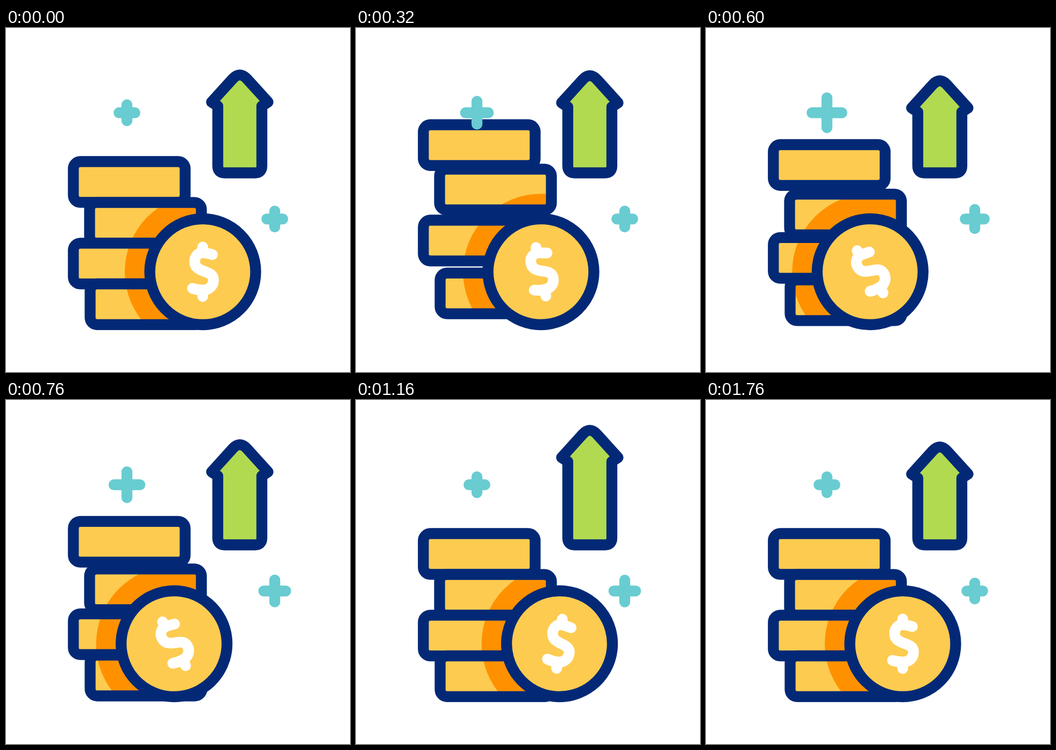
An HTML page for the animation above (1.88 s loop, 640x640 px).

```html
<!DOCTYPE html>
<html lang="en">
<head>
<meta charset="utf-8">
<title>Growing coins</title>
<style>
  html, body { margin: 0; width: 100%; height: 100%; overflow: hidden; background: #fff; }
  svg { display: block; width: 100vw; height: 100vh; }
  .line { stroke: #032976; stroke-width: 20.3; stroke-linecap: round; stroke-linejoin: round; }
  .gold { fill: #fdcb50; }
  .shade { fill: #ff9100; }
  .star { stroke: #68ccd1; stroke-width: 20.3; stroke-linecap: round; }
  .sign { fill: none; stroke: #fff; stroke-width: 20; stroke-linecap: round; stroke-linejoin: round; }
</style>
</head>
<body>
<svg viewBox="0 0 640 640">
  <defs><clipPath id="face"><rect width="208" height="75.8" rx="13"/></clipPath></defs>
  <g id="stack"></g>
  <g id="roller">
    <circle class="gold line" r="98.5"/>
    <path class="sign" d="M18-32C10-34 5-35.5 0-35.5C-9-35.5-15-28-15-19.500C-15-9-9-5 2-1C14 3 20 6 20 15.500C20 26 12 34 1 34C-6 34-13 33-19 31M0-46V-36M0 35V46"/>
  </g>
  <path id="arrow" class="line" fill="#b1da51"/>
  <path id="starA" class="star"/>
  <path id="starB" class="star"/>
</svg>
<script>
const LOOP = 1880, STEP = 40, LAST = 1760;
const AXIS_Y = 453.5, REST_X = 366, ROLL_RADIUS = 110;
const byId = id => document.getElementById(id);

// Monotone cubic curve through [time, value] keys
function track(keys) {
  const slope = i => (keys[i + 1][1] - keys[i][1]) / (keys[i + 1][0] - keys[i][0]);
  const tangent = i => {
    if (i === 0 || i === keys.length - 1) return 0;
    const a = slope(i - 1), b = slope(i);
    return a * b <= 0 ? 0 : 2 * a * b / (a + b);
  };
  return t => {
    if (t <= keys[0][0]) return keys[0][1];
    const i = keys.findIndex(k => k[0] >= t) - 1;
    if (i < 0) return keys[keys.length - 1][1];
    const [t0, v0] = keys[i], [t1, v1] = keys[i + 1];
    const d = t1 - t0, u = (t - t0) / d, w = 1 - u;
    return v0 * w * w * (1 + 2 * u) + v1 * u * u * (3 - 2 * u)
      + d * u * w * (tangent(i) * w - tangent(i + 1) * u);
  };
}

const ease = (t, from, to) => {
  const u = Math.min(1, Math.max(0, (t - from) / (to - from)));
  return (1 - Math.cos(Math.PI * u)) / 2;
};

// Linear rise and fall
const pulse = (t, start, peak, end) =>
  Math.max(0, t < peak ? (t - start) / (peak - start) : (end - t) / (end - peak));

const coins = [
  { x: 125.3, y: 248.5, lift: track([[0, 0], [320, 68.5], [370, 72], [600, 31.5], [920, 15.5], [1160, 0]]) },
  { x: 155.5, y: 324.6, lift: track([[0, 0], [320, 62], [350, 63], [600, 15.5], [920, 6.5], [1120, 0]]) },
  { x: 125.3, y: 400.4, lift: track([[0, 0], [310, 43], [600, 10.5], [880, 0]]) },
  { x: 156.5, y: 476, lift: track([[0, 0], [300, 20.3], [600, 7.5], [840, 0]]) }
];

byId('stack').innerHTML = coins.map(() => `<g>
  <rect class="gold" width="208" height="75.8" rx="13"/>
  <g clip-path="url(#face)"><circle class="shade" r="145"/></g>
  <rect class="line" fill="none" width="208" height="75.8" rx="13"/></g>`).join('');
coins.forEach((coin, i) => {
  coin.node = byId('stack').children[i];
  coin.shade = coin.node.querySelector('circle');
});

function rollX(t) {
  if (t < 640) return REST_X - 61.5 * ease(t, 100, 640);
  if (t < 1200) return 304.5 + 75 * ease(t, 640, 1200);
  return 379.5 - 13.5 * (t - 1200) / (LAST - 1200);
}

const arrowTop = t =>
  77.3 + 11 * ease(t, 240, 590) - 47.3 * ease(t, 590, 1035) + 36.3 * ease(t, 1065, 1440);

function arrowPath(top) {
  const y = d => (top + d).toFixed(2);
  return `M382.500 ${y(60.5)}L421.700 ${y(17.3)}Q435 ${y(2.7)} 448.300 ${y(17.3)}L487.500 ${y(60.5)}
    L476 ${y(68)}V256.500Q476 269.500 463 269.500H407Q394 269.500 394 256.500V${y(68)}Z`;
}

const starPath = (x, y, r) => `M${x - r} ${y}H${x + r}M${x} ${y - r}V${y + r}`;

function draw(t) {
  const x = rollX(t);
  for (const { node, shade, x: left, y, lift } of coins) {
    const top = y - lift(t);
    node.setAttribute('transform', `translate(${left} ${top})`);
    shade.setAttribute('cx', x - left);
    shade.setAttribute('cy', AXIS_Y - top);
  }
  const angle = (x - REST_X) / ROLL_RADIUS * 180 / Math.PI;
  byId('roller').setAttribute('transform', `translate(${x} ${AXIS_Y}) rotate(${angle})`);
  byId('arrow').setAttribute('d', arrowPath(arrowTop(t)));
  byId('starA').setAttribute('d', starPath(225, 157.7, 14.7 + 13 * pulse(t, 40, 600, 1160)));
  byId('starB').setAttribute('d', starPath(500, 355.3, 14.7 + 9.2 * pulse(t, 420, 970, 1440)));
}

const start = performance.now();
function tick() {
  const t = (performance.now() - start) % LOOP;
  draw(Math.min(LAST, Math.floor(t / STEP) * STEP));
  requestAnimationFrame(tick);
}
tick();
</script>
</body>
</html>
```
